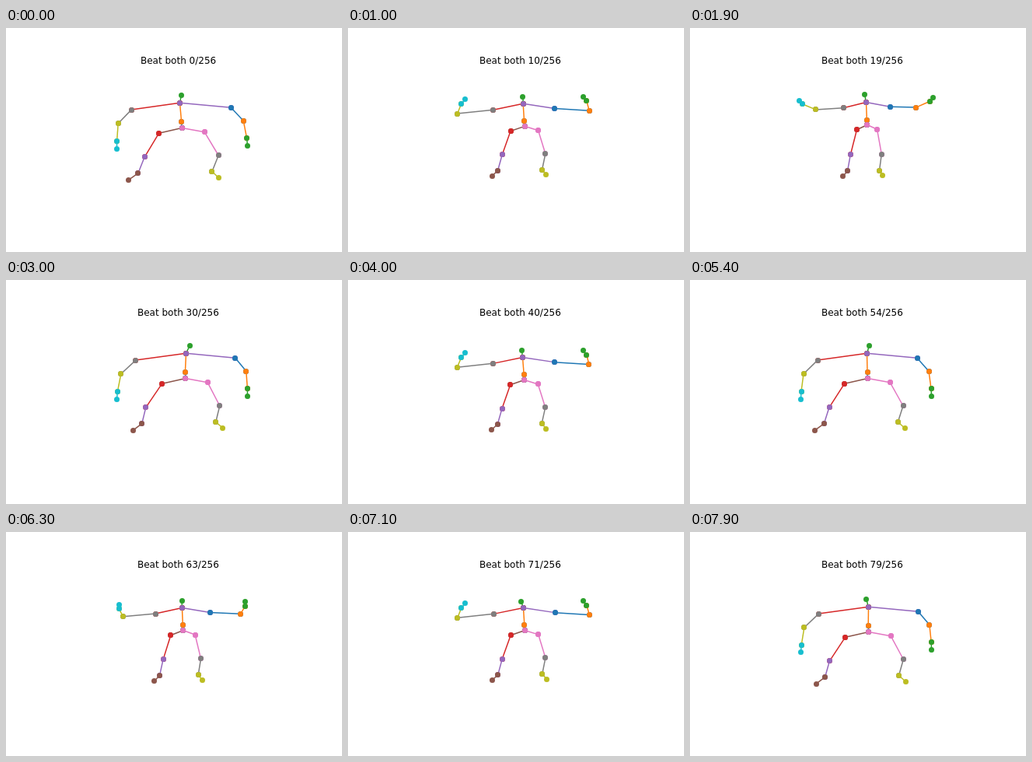
Animation, 432 px wide and 288 px high, one loop 8000 ms. Source, as an HTML page with a canvas:

```html
<!DOCTYPE html>
<html lang="en">
<head>
<meta charset="utf-8">
<title>Beat both</title>
<style>
html, body { margin: 0; width: 100%; height: 100%; overflow: hidden; background: #fff; }
canvas { display: block; width: 432px; height: 288px; }
</style>
</head>
<body>
<canvas id="stage" width="432" height="288"></canvas>
<script>
const ctx = document.getElementById('stage').getContext('2d');
const STEP = 100, COUNT = 80, TOTAL = 256;
const RATE = 0.1646; // beats per step
const CENTER = 227;
const COLORS = ['#1f77b4', '#ff7f0e', '#2ca02c', '#d62728', '#9467bd',
  '#8c564b', '#e377c2', '#7f7f7f', '#bcbd22', '#17becf'];

// Half a body, mirrored when drawn. Heights are measured from the pelvis;
// limb points are [half width, height] from the root outwards.
const OPEN = {
  trunk: [-42.5, -32.3, -8],
  arm: [[64, -24.8], [80.5, -7.5], [83.5, 15], [84, 24.7]],
  leg: [[29.3, 6], [47.5, 36.3], [47.5, 57], [57.7, 65.3]]
};
const RAISED = {
  trunk: [-37.5, -29, -7],
  arm: [[39.5, -22], [84.8, -18.2], [80.5, -30.6], [75.7, -36.3]],
  leg: [[17.8, 5.8], [27.8, 36], [28.5, 56.3], [34.8, 63.3]]
};
const CLOSED = {
  trunk: [-39, -29, -6],
  arm: [[30, -22.5], [64.5, -21], [82, -28.5], [86.5, -33]],
  leg: [[13, 6], [20, 38], [20.5, 59], [25.5, 65.5]]
};
const BEAT = [[0, OPEN], [0.128, CLOSED], [0.585, RAISED],
  [0.687, RAISED], [0.885, OPEN], [1.01, OPEN]];

// Body drift: step, neck x, pelvis y, head tilt.
const DRIFT = [[0, 223, 128, 2], [19, 226, 124, -2], [30, 231, 126, 5],
  [40, 224, 128, -1], [54, 227, 126, 3], [71, 225, 126, -3], [79, 229, 128, -3]];

// How far each limb joint follows the sway, root to tip.
const FOLLOW = { arm: [0.7, 0.45, 0.1, 0], leg: [0.5, 0.2, 0.6, 0.7] };

const ease = k => (1 - Math.cos(Math.PI * k)) / 2;

function mix(a, b, k) {
  return Array.isArray(a) ? a.map((v, i) => mix(v, b[i], k)) : a + (b - a) * k;
}

function between(keys, at) {
  let i = 0;
  while (i < keys.length - 2 && keys[i + 1][0] <= at) i++;
  const a = keys[i], b = keys[i + 1];
  return [a, b, ease((at - a[0]) / (b[0] - a[0]))];
}

function bodyAt(step) {
  const [, neckX, baseY, tilt] = mix(...between(DRIFT, step));
  const [[, from], [, to], k] = between(BEAT, step * RATE % 1);
  const sway = neckX - CENTER;

  // side: -1 is the left of the stage, 1 the right
  const limb = (part, side) => mix(from[part], to[part], k).map(([w, y], i) => {
    const shin = part === 'leg' && i > 1;
    const root = i === 0 ? 1.5 : 0;
    const mid = CENTER - 1 + root + FOLLOW[part][i] * sway - (shin ? 0.14 * w : 0);
    return [mid + side * w, baseY + y - side * 0.022 * w];
  });

  const [head, neck, spine] = mix(from.trunk, to.trunk, k);
  return {
    head: [neckX + tilt, baseY + head],
    neck: [neckX, baseY + neck],
    spine: [CENTER + 0.5 + 0.6 * sway, baseY + spine],
    pelvis: [CENTER + 1 + 0.6 * sway, baseY],
    armL: limb('arm', -1), armR: limb('arm', 1),
    legL: limb('leg', -1), legR: limb('leg', 1)
  };
}

const chain = points => points.slice(1).map((p, i) => [points[i], p]);

function bonesOf(b) {
  return [
    ...chain([b.pelvis, b.spine, b.neck, b.head]),
    [b.neck, b.armL[0]], [b.neck, b.armR[0]],
    [b.pelvis, b.legL[0]], [b.pelvis, b.legR[0]],
    ...[b.armL, b.armR, b.legL, b.legR].flatMap(chain)
  ];
}

function dot([x, y]) {
  ctx.beginPath();
  ctx.arc(Math.round(x), Math.round(y), 3.5, 0, Math.PI * 2);
  ctx.fill();
}

function draw(step) {
  ctx.fillStyle = '#fff';
  ctx.fillRect(0, 0, 432, 288);

  const title = `Beat both ${step}/${TOTAL}`;
  ctx.fillStyle = '#000';
  ctx.font = '12px "DejaVu Sans", sans-serif';
  ctx.fillText(title, Math.round(221.4 - ctx.measureText(title).width / 2), 46);

  ctx.save();
  ctx.translate(0.5, 0.5);
  ctx.lineWidth = 1.5;
  bonesOf(bodyAt(step)).forEach(([p, q], i) => {
    ctx.strokeStyle = ctx.fillStyle = COLORS[i % COLORS.length];
    ctx.beginPath();
    ctx.moveTo(...p);
    ctx.lineTo(...q);
    ctx.stroke();
    dot(p);
    dot(q);
  });
  ctx.restore();
}

const start = performance.now();
function tick() {
  const t = performance.now() - start;
  draw(Math.floor(t / STEP) % COUNT);
  requestAnimationFrame(tick);
}
tick();
</script>
</body>
</html>
```
